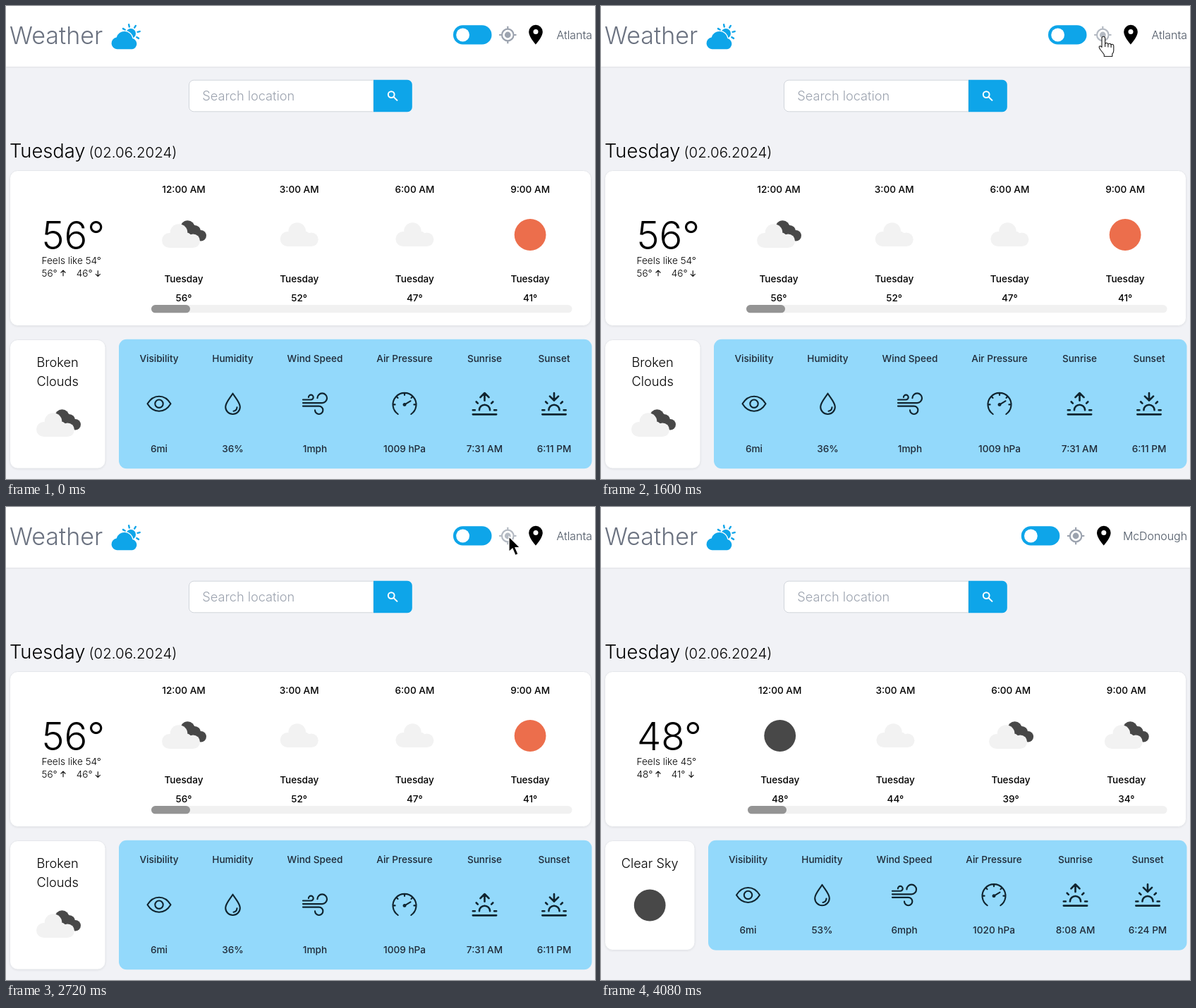
An HTML page that plays this animation: 835x671 px, repeating every 4.16 s.

```html
<!DOCTYPE html>
<html lang="en">
<head>
<meta charset="utf-8">
<title>Weather</title>
<style>
  html, body { margin: 0; width: 100%; height: 100%; overflow: hidden; background: #f1f2f6; }
  svg { display: block; width: 835px; height: 671px; }
  text {
    font-family: Inter, Roboto, sans-serif; font-weight: 300; font-size: 18.2px; fill: #000;
    font-optical-sizing: none; font-variation-settings: "opsz" 14;
  }
  .mid { text-anchor: middle; }
  .xs { font-size: 13.6px; }
  .bold { font-weight: 500; }
  .card { fill: #fff; stroke: #e5e7eb; filter: drop-shadow(0 1px 1px rgba(0, 0, 0, .06)); }
  .line { fill: none; stroke: #10242f; stroke-width: 2.1; stroke-linecap: round; stroke-linejoin: round; }
  .blue { fill: #0ea5e9; }
  .off { display: none; }
</style>
</head>
<body>
<svg id="stage" viewBox="0 0 835 671"></svg>
<script>
const LOOP = 4160, TICK = 80;

const at = (x, y, body) => `<g transform="translate(${x} ${y})">${body}</g>`;
const text = (x, y, s, cls = '', extra = '') => `<text x="${x}" y="${y}" class="${cls}" ${extra}>${s}</text>`;
const rect = (x, y, w, h, r, extra = '') => `<rect x="${x}" y="${y}" width="${w}" height="${h}" rx="${r}" ${extra}/>`;
const disc = (x, y, r, extra = '') => `<circle cx="${x}" cy="${y}" r="${r}" ${extra}/>`;
const path = (d, extra = '') => `<path d="${d}" ${extra}/>`;

// Straight marks radiating from a point; angles in degrees.
const rays = (cx, cy, r0, r1, angles) => angles.map(a => {
  const c = Math.cos(a * Math.PI / 180), s = Math.sin(a * Math.PI / 180);
  return `M${cx + r0 * c} ${cy + r0 * s}L${cx + r1 * c} ${cy + r1 * s}`;
}).join('');

const puff = disc(-16.5, 6.5, 10.5) + disc(-3, -4.5, 12.3) + disc(8, 3, 7.5) + disc(17.2, 7.3, 9.8) +
  rect(-16.5, 3, 33.7, 14.1, 0);

const sky = {
  cloud: `<g fill="#f2f2f2">${puff}</g>`,
  broken: `<g fill="#484848">${disc(5.5, -9.6, 10.2) + disc(15.5, -4.5, 8.6) + disc(24.2, 1.8, 7.8) + disc(15, 2, 8)}</g>` +
    at(-4, 2, `<g fill="#f2f2f2">${puff}</g>`),
  sun: disc(0, .5, 22.4, 'fill="#ec6e4c"'),
  night: disc(0, .5, 22.4, 'fill="#484848"')
};

// Icons on a small unit grid, enlarged around its centre.
const unit = (size, weight, d) => {
  const k = 36.36 / size;
  return path(d, `transform="scale(${k}) translate(${-size / 2} ${-size / 2})" stroke-width="${weight}"`);
};
const sunLine = 'M17 18a5 5 0 0 0-10 0M1 18h2M21 18h2M1 22h22M4.22 10.22l1.42 1.42M18.36 11.64l1.42-1.42';
const icons = [
  path('M-16.5 0C-8-14 8-14 16.5 0C8 14-8 14-16.5 0Z') + disc(0, 0, 5.7),
  path('M0-14.5C-4-8-10.3-1.5-10.3 4.5a10.3 10.3 0 0 0 20.6 0C10.3-1.5 4-8 0-14.5ZM6 5a6 6 0 0 1-5 5.5'),
  unit(16, .95, 'M.5 5.5h5a1.5 1.5 0 1 0-1.5-1.5M.5 7.5h12a3 3 0 1 0-3-3M.5 9.5h10a2.5 2.5 0 1 1-2.5 2.5'),
  at(0, 1.2, path('M-9.3 13.6a16.5 16.5 0 1 1 18.6 0' + rays(0, 0, 13.4, 16, [-180, -135, -90, -45, 0]) + 'M1-.5L8.5-5') + disc(0, 0, 1.4)),
  unit(24, 1.75, sunLine + 'M12 2v7M8 6l4-4l4 4'),
  unit(24, 1.75, sunLine + 'M12 9V2M16 5l-4 4l-4-4')
];
const labels = ['Visibility', 'Humidity', 'Wind Speed', 'Air Pressure', 'Sunrise', 'Sunset'];

const cities = [
  {
    name: 'Atlanta', shift: 0, now: 56, feels: 54, low: 46, lowArrow: 130.3, left: 206, bottom: 656, split: 141, hour0: 252,
    temps: [56, 52, 47, 41], skies: ['broken', 'cloud', 'cloud', 'sun'],
    title: ['Broken', 'Clouds'], main: ['broken', 74, 592],
    cols: [217, 321.5, 438, 565, 678.5, 777],
    facts: ['6mi', '36%', '1mph', '1009 hPa', '7:31 AM', '6:11 PM']
  },
  {
    name: 'McDonough', shift: -38.2, now: 48, feels: 45, low: 41, lowArrow: 128, left: 208, bottom: 628.5, split: 133, hour0: 253.7,
    temps: [48, 44, 39, 34], skies: ['night', 'cloud', 'broken', 'broken'],
    title: ['Clear Sky'], main: ['night', 69.2, 564.5],
    cols: [208.5, 313.5, 430, 557, 672.5, 775],
    facts: ['6mi', '53%', '6mph', '1020 hPa', '8:08 AM', '6:24 PM']
  }
];

const corner = c => at(c.shift, 0,
  rect(634, 27.3, 54.5, 27.3, 13.6, 'class="blue"') + disc(647.6, 41, 9.4, 'fill="#fff"') +
  `<g class="locate" fill="none" stroke="#9ca3af" stroke-width="2.2">${disc(711.3, 41, 8.3)}${path(rays(711.3, 41, 8.3, 12.2, [0, 90, 180, 270]))}${disc(711.3, 41, 4.4, 'fill="#9ca3af" stroke="none"')}</g>` +
  path('M751 26.8a9.8 9.8 0 0 0-9.8 9.8C741.2 44 751 54.6 751 54.6S760.8 44 760.8 36.6A9.8 9.8 0 0 0 751 26.8Z') +
  disc(751, 36.6, 3.5, 'fill="#fff"')) +
  text(831, 47, c.name, '', 'text-anchor="end" style="font-size:15.9px;fill:#4b5563"');

const arrowMark = (x, y, flip) =>
  path('M0 4V-4M-3.4-.8L0-4.2L3.4-.8', `transform="translate(${x} ${y}) scale(1 ${flip})" fill="none" stroke="#111" stroke-width="1.15"`);

const report = c => {
  const hours = ['12:00 AM', '3:00 AM', '6:00 AM', '9:00 AM'].map((h, i) => {
    const x = c.hour0 + i * 163.7;
    return text(x, 264.8, h, 'mid xs bold') + at(x, 324, sky[c.skies[i]]) +
      text(x, 392, 'Tuesday', 'mid xs bold') + text(x, 419.3, c.temps[i] + '°', 'mid xs bold');
  }).join('');
  const mid = (473 + c.bottom) / 2, box = c.bottom - 473, blueX = c.split + 19;
  const facts = c.cols.map((x, i) =>
    text(x, 505.2, labels[i], 'mid xs bold', 'style="fill:#1f2937"') +
    at(x, mid - .3, `<g class="line">${icons[i]}</g>`) +
    text(x, c.bottom - 23.3, c.facts[i], 'mid xs bold', 'style="fill:#1f2937"')).join('');
  return text(5, 214.5, 'Tuesday', '', 'style="font-size:27.3px"') +
    text(117.5, 214.5, '(02.06.2024)', '', 'style="font-size:20.45px"') +
    rect(5.5, 233.5, 824, 220, 11, 'class="card"') +
    text(51, 345, c.now + '°', '', 'style="font-size:54.5px"') +
    text(50.5, 366, `Feels like ${c.feels}°`, 'xs') +
    text(50.5, 384, c.now + '°', 'xs') + arrowMark(81, 379.3, 1) +
    text(99.7, 384, c.low + '°', 'xs') + arrowMark(c.lowArrow, 379.3, -1) +
    rect(c.left, 424, 802.5 - c.left, 11.3, 5.6, 'fill="#f1f1f1"') +
    rect(c.left, 424, 55, 11.3, 5.6, 'fill="#949494"') + hours +
    rect(5.5, 473.5, c.split - 5.5, box - .5, 11, 'class="card"') +
    c.title.map((s, i) => text(c.split / 2 + 2.7, 511.7 + i * 27.3, s, 'mid')).join('') +
    at(c.main[1], c.main[2], sky[c.main[0]]) +
    rect(blueX, 472.7, 830.5 - blueX, box + .5, 11, 'fill="#93d9fb"') + facts;
};

const skeleton = () => {
  const bar = (x, y, w, h) => rect(x, y, w, h, 4.5);
  let s = bar(4.5, 186.6, 109, 27.3) + bar(118.3, 186.6, 109, 27.3) + bar(4.5, 477.8, 163.6, 36.4);
  for (const x of [170, 592]) for (const y of [223, 341.4])
    s += bar(x, y, 72.7, 27.3) + disc(x + 36.4, y + 50, 13.6) + bar(x, y + 72.8, 72.7, 27.3);
  for (const y of [532.5, 596.4, 651]) s += bar(4.5, y, 127.3, 36.4);
  return `<g fill="#dcdde2">${s + disc(449.4, 555.2, 22.7) + bar(426.7, 596.4, 127.3, 36.4) + disc(449.4, 673.7, 22.7)}</g>`;
};

const header =
  rect(0, 0, 835, 86, 0, 'fill="#fff" style="filter:drop-shadow(0 1px 1px rgba(0,0,0,.07))"') +
  text(5, 53.8, 'Weather', '', 'style="font-size:34.1px;fill:#6b7280"') +
  disc(177, 39, 7, 'class="blue"') +
  path(rays(177, 39, 9.8, 13, [-148, -103, -58, -13, 32]), 'stroke="#0ea5e9" stroke-width="2.4" stroke-linecap="round"') +
  path('M157.5 61.2a8.4 8.4 0 0 1-.8-16.7a11.6 11.6 0 0 1 22.7 1.6a7.7 7.7 0 0 1-.4 15.1Z',
    'class="blue" stroke="#fff" stroke-width="2.4" paint-order="stroke"');

const search =
  path('M521 105.2H266.3a6.8 6.8 0 0 0-6.8 6.8V143a6.8 6.8 0 0 0 6.8 6.8H521Z', 'fill="#fff" stroke="#d1d5db"') +
  path('M521 104.8H569a6.8 6.8 0 0 1 6.8 6.8V143.4a6.8 6.8 0 0 1-6.8 6.8H521Z', 'class="blue"') +
  `<g fill="none" stroke="#fff" stroke-width="2">${disc(546.2, 125.6, 4.4)}${path('M549.5 129L555 134.4')}</g>` +
  text(278.3, 134, 'Search location', '', 'style="fill:#9ca3af"');

const hand = path('M-2.3 2.5a2.3 2.3 0 0 1 4.6 0V11a2.2 2.2 0 0 1 4.3 .6a2.2 2.2 0 0 1 4.2 .8a2 2 0 0 1 3.7 1V20q0 3-2 5V28.5H1V26q-2-3-5-6.5q-3.4-4.5-1.4-5.5q1.6-.8 3.1 1.5Z' +
  'M2.3 11V15M6.6 11.5V15.5M10.8 12.5V16', 'fill="#fff" stroke="#222" stroke-width="1.15" stroke-linejoin="round"');
const arrow = path('M0 0V21.5L5 17L9 26.5L13 24.8L9 15.5H15.6Z', 'stroke="#fff" stroke-width="1.2"');

const group = (id, body) => `<g id="${id}">${body}</g>`;
document.getElementById('stage').innerHTML =
  rect(0, 0, 835, 671, 0, 'fill="#f1f2f6"') + header + search +
  cities.map((c, i) => group('corner' + i, corner(c)) + group('report' + i, report(c))).join('') +
  group('skeleton', skeleton()) + group('hand', hand) + group('arrow', arrow);

const el = id => document.getElementById(id);
const show = (id, on) => el(id).classList.toggle('off', !on);
const place = (id, x, y) => el(id).setAttribute('transform', `translate(${x} ${y})`);
const ramp = (t, a, b) => Math.min(1, Math.max(0, (t - a) / (b - a)));

function draw(time) {
  const t = Math.floor(time % LOOP / TICK) * TICK;
  const loading = t >= 1680 && t < 2720, second = t >= 3200;
  const pointing = t >= 880 && t < 2720, leaving = t >= 2720 && t < 3040;

  show('corner0', !second);
  show('corner1', second);
  show('report0', !second && !loading);
  show('report1', second);
  show('skeleton', loading);
  show('hand', pointing);
  show('arrow', leaving);

  const settle = ramp(t, 960, 1360), exit = ramp(t, 2720, 3040) ** 2;
  place('hand', 712 + .3 * settle, 38 + 5 * settle);
  place('arrow', 713 - 60 * exit, 42 + 630 * exit);
  document.querySelector('#corner0 .locate').style.opacity = pointing || t === 2720 ? .75 : 1;
}

const start = performance.now();
function tick() {
  draw(performance.now() - start);
  requestAnimationFrame(tick);
}
tick();
</script>
</body>
</html>
```
